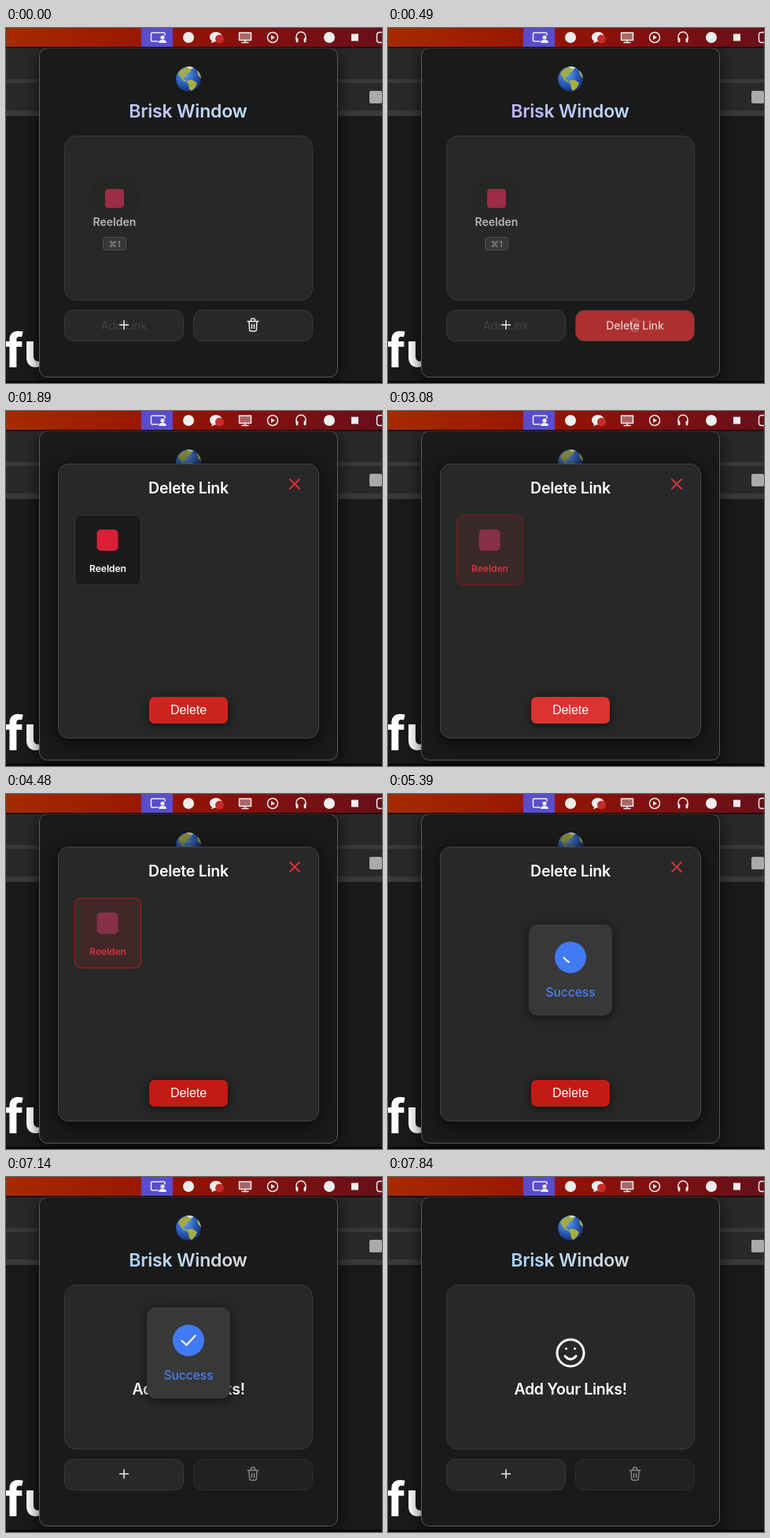
Write an HTML page that moves like this. It is 478x452 px and loops after 7910 ms.

```html
<!DOCTYPE html>
<html lang="en">
<head>
<meta charset="utf-8">
<title>Link launcher</title>
<style>
html, body { margin: 0; width: 100%; height: 100%; overflow: hidden; background: #1a1a1a; }
svg { display: block; width: 478px; height: 452px; }
text { font-family: Inter, "Open Sans", sans-serif; font-weight: 600; text-anchor: middle; fill: #fff; }
.line { fill: none; stroke: #eee; stroke-width: 1.5; stroke-linecap: round; stroke-linejoin: round; }
.box { fill: #272828; stroke: #3b3b3b; }
.shade { filter: drop-shadow(0 2px 7px #0009); }
.deep { filter: drop-shadow(0 4px 10px #000b); }
</style>
</head>
<body>
<svg viewBox="0 0 478 452">
  <defs>
    <linearGradient id="bar">
      <stop stop-color="#a52b00"/><stop offset=".4" stop-color="#981500"/>
      <stop offset=".65" stop-color="#84100f"/><stop offset="1" stop-color="#68101a"/>
    </linearGradient>
    <linearGradient id="hue" gradientUnits="userSpaceOnUse" x1="161" x2="302">
      <stop id="hueL"/><stop id="hueR" offset="1"/>
    </linearGradient>
    <radialGradient id="sea" cx=".36" cy=".3" r=".75">
      <stop stop-color="#6ba6ea"/><stop offset=".5" stop-color="#2d62c4"/><stop offset="1" stop-color="#14296c"/>
    </radialGradient>
    <clipPath id="disc"><circle cx="232" cy="65" r="16"/></clipPath>
  </defs>

  <!-- Desktop -->
  <path fill="#1a1a1a" d="M0 0h478v452H0z"/>
  <path fill="#292929" d="M0 25h478v80H0z"/>
  <path fill="#393939" d="M0 65h478v5H0zM0 105h478v7H0z"/>
  <path fill="#0d090b" d="M0 449h478v3H0z"/>
  <text x="-2" y="432" font-size="61" style="text-anchor:start;font-weight:700">fu</text>
  <rect x="462" y="80" width="16" height="16" rx="2" fill="#aaa"/>

  <!-- Window -->
  <rect class="deep" x="42.500" y="25.500" width="379" height="419" rx="10" fill="#1a1a1a" stroke="#5b5b5b"/>
  <g id="globe" clip-path="url(#disc)">
    <circle cx="232" cy="65" r="16" fill="url(#sea)"/>
    <path fill="#a3ac45" d="M220 56q5-6 11-6l6 2-3 4-4 2-2 4-3 1 2 3 4 2-1 1-5-2-4-6-2-2zM232 66l5 0 6 4-2 5-5 5-3-2-1-6-2-3z"/>
    <path fill="#a3ac45" d="M243 54l5 4v6l-4-4z"/>
    <path fill="#dfe9e6" d="M229 49l6-1 4 3-5 1z"/>
  </g>
  <text x="231.500" y="114" font-size="23" letter-spacing="-.2" style="fill:url(#hue)">Brisk Window</text>
  <rect class="box" x="74.500" y="137.500" width="315" height="209" rx="15"/>
  <g id="link">
    <circle cx="138" cy="217" r="32" fill="#252626"/>
    <rect x="126" y="205" width="24" height="24" rx="4" fill="#9c2c48"/>
    <text x="138" y="252" font-size="14" style="fill:#b6b6b6">Reelden</text>
    <rect x="123.500" y="266.500" width="29" height="16" rx="3" fill="#363737" stroke="#525252"/>
    <text x="138" y="279" font-size="11" style="fill:#8b8b8b;font-family:Inter,'DejaVu Sans',sans-serif;font-weight:500">⌘1</text>
  </g>
  <g id="empty">
    <g class="line" style="stroke:#fff;stroke-width:3">
      <circle cx="232" cy="224" r="17"/>
      <path d="M225 228q7 8 14 0M226.500 218.500v.1M237.500 218.500v.1"/>
    </g>
    <text x="232" y="277" font-size="19.500" letter-spacing="-.3">Add Your Links!</text>
  </g>
  <rect class="box" x="74.500" y="359.500" width="151" height="39" rx="11"/>
  <text id="ghost" x="150" y="384" font-size="14" style="fill:#414242;font-weight:400">Add Link</text>
  <path class="line" d="M144.500 378h11M150 372.500v11"/>
  <rect id="bin" x="238.500" y="359.500" width="151" height="39" rx="11"/>
  <path id="can" class="line" d="M307 373.500h14M309 373.500l.6 10.500q.1 2 2 2h4.800q1.900 0 2-2l.6-10.500M311.500 373v-1.500q0-1.500 1.500-1.500h2q1.500 0 1.500 1.500v1.500M312.500 377.500v5M315.500 377.500v5"/>
  <text id="binText" x="314" y="384" font-size="14" letter-spacing="-.1" style="font-weight:500">Delete Link</text>

  <!-- Menu bar -->
  <path fill="url(#bar)" d="M0 0h478v24H0z"/>
  <path fill="#100809" d="M0 24h478v1.500H0z"/>
  <rect x="172" width="40" height="24" fill="#594dcd"/>
  <g class="line">
    <path d="M193 17h-7q-1.500 0-1.500-1.500V7.500Q184.500 6 186 6h14.500q1.500 0 1.500 1.500V9"/>
    <path fill="#a66" d="M296.500 6h15v9.500h-15z"/>
    <path d="M304 16v2.500M300 18.500h8"/>
    <circle cx="339" cy="12" r="6.500"/>
    <path d="M369 14v-3a6 6 0 0 1 12 0v3"/>
    <path stroke-width="2.800" d="M370 14v3M380 14v3"/>
    <path d="M480 5.500h-5q-3.500 0-3.500 3.500v6q0 3.500 3.500 3.500h5"/>
  </g>
  <g fill="#eee">
    <circle cx="199" cy="12" r="2.600"/><path d="M194 19q0-4 5-4t5 4z"/>
    <circle cx="232" cy="12" r="7"/>
    <path d="M267 5c-5 0-8 3-8 6.500 0 2.500 1 4 3 5l-1 3 4-2h2c5 0 8-3 8-6s-3-6.500-8-6.500z"/>
    <path d="M337 9l5 3-5 3z"/>
    <circle cx="411" cy="12" r="7"/>
    <rect x="439" y="7.500" width="9" height="9"/>
  </g>
  <circle cx="271.500" cy="14" r="5.500" fill="#c72c28"/>

  <!-- Dialog -->
  <g id="dialog">
    <rect class="deep" x="66.500" y="67.500" width="331" height="349" rx="13" fill="#272928" stroke="#454545"/>
    <text x="232" y="105" font-size="19.500" letter-spacing="-.25">Delete Link</text>
    <path class="line" style="stroke:#d93038;stroke-width:2" d="M361 87l12 12M373 87l-12 12"/>
    <g id="card">
      <rect id="cardBox" x="87.500" y="132.500" width="84" height="89" rx="7"/>
      <rect id="logo" x="115.500" y="151" width="27" height="27" rx="5"/>
      <text id="cardText" x="129.500" y="205" font-size="12">Reelden</text>
    </g>
    <rect id="del" class="shade" x="182" y="364" width="100" height="34" rx="7"/>
    <text x="232" y="386" font-size="16" style="font-family:'Liberation Sans',Arial,sans-serif;font-weight:400">Delete</text>
  </g>

  <!-- Toast -->
  <g id="toast">
    <rect class="shade" x="179" y="166" width="106" height="116" rx="11" fill="#383838"/>
    <circle cx="232" cy="208" r="20" fill="#417af5"/>
    <path id="tick" class="line" style="stroke:#fff;stroke-width:2.200" pathLength="1" stroke-dasharray="1 2" d="M223.500 208.500l6 5.500 11-12"/>
    <text x="232" y="258" font-size="15.500" style="fill:#487ff5;font-weight:500">Success</text>
  </g>
</svg>
<script>
const LOOP = 7910;
const $ = id => document.getElementById(id);
const titleHues = [
  [0, 0xc1c1fb, 0xbfe0ff], [980, 0xb9a8fb, 0xbcd4fc],
  [6090, 0xb4d2ea, 0xddd6d8], [7840, 0xa8d4fc, 0xd8dadd], [LOOP, 0xa8d4fc, 0xd8dadd]
];

// Eased progress of t from a to b
const ease = (t, a, b) => {
  const p = Math.min(1, Math.max(0, (t - a) / (b - a)));
  return p * p * (3 - 2 * p);
};

const mix = (a, b, p) => 'rgb(' + [16, 8, 0].map(s => {
  const x = a >> s & 255, y = b >> s & 255;
  return Math.round(x + (y - x) * p);
}) + ')';

const fade = (id, p) => $(id).style.opacity = p;
const paint = (id, prop, color) => $(id).style[prop] = color;
const zoom = (id, cx, cy, k) =>
  $(id).setAttribute('transform', `translate(${cx} ${cy}) scale(${k}) translate(${-cx} ${-cy})`);

function draw(t) {
  const i = titleHues.findIndex(k => k[0] > t);
  const [a, b] = [titleHues[i - 1], titleHues[i]];
  const p = (t - a[0]) / (b[0] - a[0]);
  paint('hueL', 'stopColor', mix(a[1], b[1], p));
  paint('hueR', 'stopColor', mix(a[2], b[2], p));

  const removed = t >= 5110;
  fade('link', removed ? 0 : 1);
  fade('empty', removed ? 1 : 0);
  fade('ghost', t < 910 ? 1 : 0);

  const binHover = removed ? 0 : ease(t, 210, 630);
  paint('bin', 'fill', mix(removed ? 0x202121 : 0x272828, 0xdc3232, binHover));
  paint('bin', 'stroke', mix(removed ? 0x2e2e2e : 0x3b3b3b, 0x5a3c3c, binHover));
  paint('can', 'stroke', removed ? '#858585' : '#eee');
  fade('can', 1 - binHover);
  fade('binText', binHover);

  const open = ease(t, 1190, 1540) * (1 - ease(t, 5810, 6050));
  fade('dialog', open);
  zoom('dialog', 232, 242, .95 + .05 * open);
  fade('globe', 1 - .25 * open);

  const hover = ease(t, 2240, 2660), picked = ease(t, 2900, 3360);
  paint('cardBox', 'fill', hover < 1 ? mix(0x1a1b1b, 0x392829, hover) : mix(0x392829, 0x402829, picked));
  paint('cardBox', 'stroke', hover < 1 ? mix(0x383838, 0x65191f, hover) : mix(0x65191f, 0xb0181f, picked));
  paint('logo', 'fill', mix(0xd81f35, 0x86304a, hover));
  paint('cardText', 'fill', mix(0xffffff, 0xd83040, hover));
  fade('card', 1 - ease(t, 5040, 5250));

  const pass = .6 * ease(t, 1680, 1890) * (1 - ease(t, 1900, 2100));
  paint('del', 'fill', mix(0xdc3232, 0xc41a14, Math.max(pass, ease(t, 4060, 4410))));

  const shown = ease(t, 5110, 5390) * (1 - ease(t, 7490, 7800));
  fade('toast', shown);
  zoom('toast', 232, 224, .9 + .1 * shown);
  $('tick').setAttribute('stroke-dashoffset', 1 - ease(t, 5250, 5600));
}

const start = performance.now();
function tick() {
  draw((performance.now() - start) % LOOP);
  requestAnimationFrame(tick);
}
tick();
</script>
</body>
</html>
```
